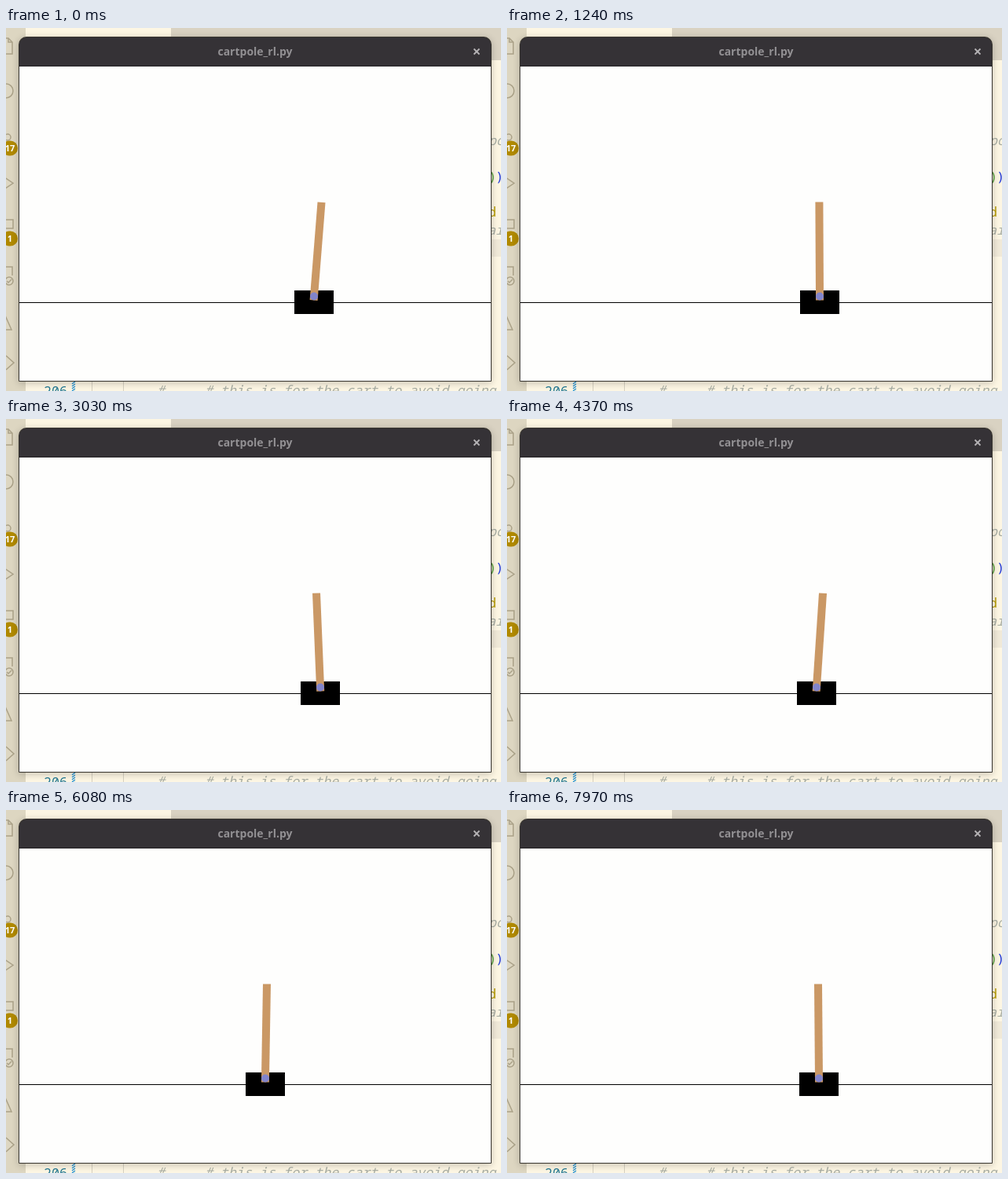
These frames come from a looping animation (630x462 px, 8000 ms). An HTML page with a canvas:

```html
<!DOCTYPE html>
<html lang="en">
<head>
<meta charset="utf-8">
<title>Cart pole</title>
<style>
  html, body { margin: 0; width: 100%; height: 100%; overflow: hidden; background: #fdf6e3; }
  canvas { display: block; }
</style>
</head>
<body>
<canvas id="stage" width="630" height="462"></canvas>
<script>
const ctx = document.getElementById('stage').getContext('2d');
const LOOP = 8000;
const RESET = 5450;
const MONO = '"Noto Sans Mono", "DejaVu Sans Mono", monospace';
const SANS = '"Noto Sans", "Open Sans", sans-serif';
const ICON = '#aaa188', BADGE = '#b08900', NOTE = '#a9aea4';

// Balancing poses before the reset.
const sway = [
  { t: 0, x: 392, tip: 9.5 },
  { t: 570, x: 401, tip: -3 },
  { t: 1950, x: 394, tip: 2 },
  { t: 3030, x: 400, tip: -5 },
  { t: 3600, x: 405, tip: -5 },
  { t: 4370, x: 394, tip: 8 },
  { t: 4800, x: 405, tip: -4 },
  { t: RESET, x: 396, tip: 1 }
];

const mix = (a, b, u) => a + (b - a) * u;
const ease = u => u * u * (3 - 2 * u);

function pose(t) {
  if (t >= RESET) {
    // A new episode starts near the middle and drifts right.
    const u = (t - RESET) / (7970 - RESET);
    return { x: 314 + 83 * u ** 1.2, tip: 3 - 4 * u };
  }
  const i = sway.findIndex(p => p.t > t);
  const a = sway[i - 1], b = sway[i];
  const u = ease((t - a.t) / (b.t - a.t));
  return { x: mix(a.x, b.x, u), tip: mix(a.tip, b.tip, u) };
}

function box(color, x, y, w, h) {
  ctx.fillStyle = color;
  ctx.fillRect(x, y, w, h);
}

function pill(color, x, y, w, h, r) {
  ctx.beginPath();
  ctx.roundRect(x, y, w, h, r);
  ctx.fillStyle = color;
  ctx.fill();
}

function text(str, x, y, color, font, align = 'left') {
  ctx.font = font;
  ctx.fillStyle = color;
  ctx.textAlign = align;
  ctx.fillText(str, x, y);
}

function line(...points) {
  ctx.beginPath();
  points.forEach(([x, y]) => ctx.lineTo(x, y));
  ctx.stroke();
}

function ring(x, y, r) {
  ctx.beginPath();
  ctx.arc(x, y, r, 0, Math.PI * 2);
  ctx.stroke();
}

function badge(label, right, y) {
  pill(BADGE, right - 20, y - 9.5, 20, 19, 9.5);
  text(label, right - 10, y + 4, '#fff', 'bold 11px ' + SANS, 'center');
}

function drawSidebar() {
  box('#ddd6c1', 0, 0, 25, 462);
  ctx.strokeStyle = ICON;
  ctx.lineWidth = 1.5;
  line([-2, 13], [3, 13], [8, 18], [8, 33], [-2, 33]);
  line([3, 13], [3, 18], [8, 18]);
  ring(0, 80, 9);
  ring(2, 139, 4);
  line([-2, 190], [9, 197.5], [-2, 205]);
  line([-2, 244], [9, 244], [9, 255], [-2, 255]);
  line([-2, 304], [8, 304], [8, 315]);
  ring(4, 322, 5);
  line([1, 322], [3, 324], [7, 320]);
  line([-1, 366], [7, 384], [-2, 384]);
  line([0, 417], [10, 426], [0, 435]);
  badge('17', 15, 153);
  badge('1', 15, 268);
}

function drawEditor() {
  const code = '16.7px ' + MONO, note = 'italic ' + code;
  box('#fdf6e3', 25, 0, 605, 462);
  box('#d9d2c2', 210, 0, 420, 41);
  box('#f0e9d8', 617, 269, 13, 22);
  text('po', 614, 149, NOTE, note);
  text(')', 614, 195, '#4f9a35', code);
  text(')', 623, 195, '#2038d8', code);
  text('d', 614, 240, '#b59a00', code);
  text('ai', 613, 263, NOTE, note);

  text('206', 48, 468, '#237893', code);
  ctx.strokeStyle = '#2090d3';
  ctx.lineWidth = 1.3;
  for (let y = 450; y < 464; y += 3) line([84, y + 3], [88, y]);
  box('#d6d0c0', 109, 450, 1, 12);
  box('#d6d0c0', 149, 450, 1, 12);
  text('#', 192, 467, NOTE, note);
  text('# this is for the cart to avoid going', 253, 467, NOTE, note);
}

function drawWindow() {
  ctx.shadowColor = 'rgba(0, 0, 0, 0.22)';
  ctx.shadowBlur = 10;
  ctx.shadowOffsetY = 2;
  pill('#38352f', 16, 11, 602, 439, [10, 10, 1, 1]);
  ctx.shadowColor = 'transparent';
  box('#fefefd', 17, 49, 600, 400);
  pill('#353236', 17, 12, 600, 36, [9, 9, 0, 0]);
  box('#232124', 17, 48, 600, 1);
  text('cartpole_rl.py', 317, 35, '#929093', '600 14px ' + SANS, 'center');
  ctx.strokeStyle = '#b5b3b5';
  ctx.lineWidth = 1.8;
  line([595.5, 26.5], [602.5, 33.5]);
  line([602.5, 26.5], [595.5, 33.5]);
}

function drawCart({ x, tip }) {
  const mid = Math.round(x);
  box('#000', 17, 349, 600, 1);
  box('#000', mid - 25, 334, 50, 30);
  ctx.save();
  ctx.translate(mid, 341.5);
  ctx.rotate(Math.asin(tip / 120));
  box('#ca9865', -5, -120, 10, 125);
  ctx.restore();
  pill('#8184cb', mid - 5, 336.5, 10, 10, 5);
}

const start = performance.now();

function frame() {
  drawEditor();
  drawSidebar();
  drawWindow();
  drawCart(pose((performance.now() - start) % LOOP));
  requestAnimationFrame(frame);
}

frame();
</script>
</body>
</html>
```
